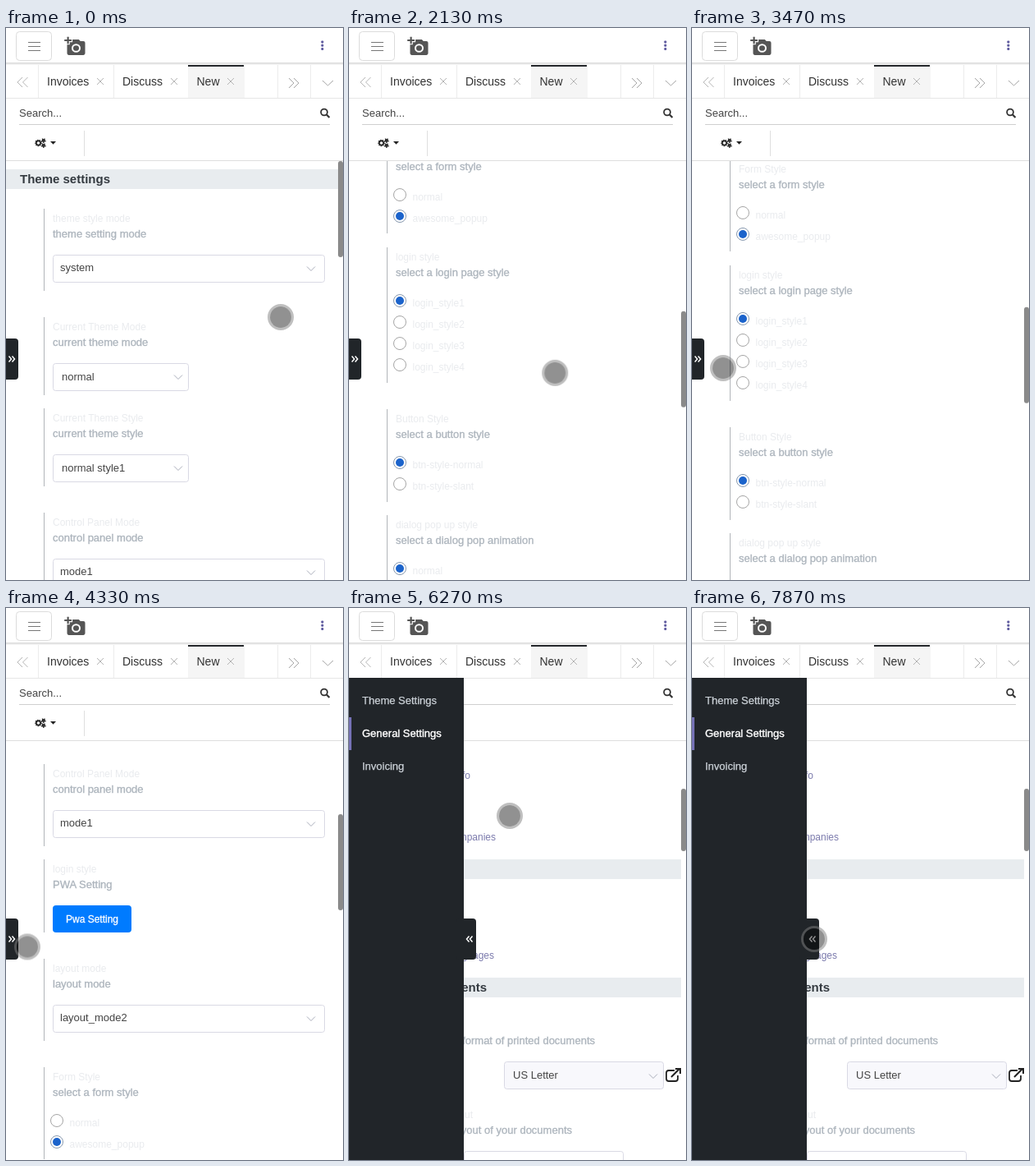
Animation of 411 by 672 pixels, one loop 8 s. Source, as an HTML page:

```html
<!DOCTYPE html>
<html lang="en">
<head>
<meta charset="utf-8">
<title>Theme settings</title>
<style>
@property --s { syntax: "<number>"; inherits: true; initial-value: 0; }
html, body { margin: 0; width: 100%; height: 100%; overflow: hidden; background: #fff; }
svg { display: block; width: 411px; height: 672px; animation: scroll 8s linear infinite; }
text { font: 13px "Liberation Sans", Arial, sans-serif; fill: #444; }
.title, .opt { font-size: 12px; fill: #e9ebee; }
.sub { fill: #adb5bd; stroke: #adb5bd; stroke-width: .35px; }
.head { font-size: 15px; font-weight: bold; fill: #343a40; }
.tab { font-size: 14px; fill: #333; }
.link { font-size: 12px; fill: #7c7bad; }
.btn { font-size: 12px; fill: #fff; stroke: #fff; stroke-width: .3px; }
.item { fill: #ced4da; stroke: #ced4da; stroke-width: .25px; }
.on { fill: #fff; stroke: #fff; stroke-width: .4px; }
.end { text-anchor: end; }
.line { fill: none; }

#list { transform: translateY(calc(var(--s) * -1px)); }
#thumb { transform: translateY(calc(var(--s) * .2225px)); }
.before { animation: hide 8s step-end infinite; }
.after { animation: show 8s step-end infinite; }
.shut { animation: shut 8s step-end infinite; }
.open { animation: open 8s step-end infinite; }
#side { animation: slide 8s linear infinite; }
#cursor { animation: move 8s linear infinite; }

@keyframes scroll {
  0%, 20.75% { --s: 0; animation-timing-function: ease-in; }
  21.625% { --s: 24; }
  24% { --s: 400; }
  26.5% { --s: 800; }
  29.125% { --s: 1200; }
  30% { --s: 1200; animation-timing-function: ease-out; }
  32.5% { --s: 1398; }
  33.125%, 34% { --s: 1400; animation-timing-function: ease-in-out; }
  37.5%, 40.875% { --s: 1000; animation-timing-function: ease-out; }
  43.375% { --s: 800; }
  46% { --s: 600; animation-timing-function: ease-out; }
  50.875%, 100% { --s: 400; }
}
@keyframes hide { 0% { visibility: visible; } 75%, 100% { visibility: hidden; } }
@keyframes show { 0% { visibility: hidden; } 75%, 100% { visibility: visible; } }
@keyframes shut { 0% { visibility: visible; } 60.5%, 100% { visibility: hidden; } }
@keyframes open { 0% { visibility: hidden; } 60.5%, 100% { visibility: visible; } }
@keyframes slide {
  0%, 60% { transform: translateX(-140px); animation-timing-function: ease; }
  64.5%, 100% { transform: none; }
}
@keyframes move {
  0%, 10% { transform: translate(335px, 352px); }
  11.3% { transform: translate(359px, 405px); }
  12.6% { transform: translate(342px, 473px); }
  14.125%, 19.125% { transform: translate(314px, 440px); animation-timing-function: ease-out; }
  21.625% { transform: translate(276px, 361px); }
  25% { transform: translate(262px, 400px); }
  29.125%, 30% { transform: translate(235px, 450px); }
  32.5% { transform: translate(227px, 458px); animation-timing-function: ease-in-out; }
  37.5%, 40.875% { transform: translate(35px, 415px); }
  43.375% { transform: translate(38px, 414px); }
  47% { transform: translate(31px, 424px); }
  50.875%, 51.625% { transform: translate(39px, 435px); }
  54.125% { transform: translate(26px, 412.5px); }
  57.5%, 61.5% { transform: translate(17px, 403px); animation-timing-function: ease-in-out; }
  70% { transform: translate(83px, 156px); }
  71.625%, 74.125% { transform: translate(87px, 152px); }
  78.375% { transform: translate(196px, 253px); animation-timing-function: ease-in-out; }
  84.125%, 85% { transform: translate(61px, 231px); animation-timing-function: ease-in-out; }
  88.375%, 90.875% { transform: translate(318px, 218px); animation-timing-function: ease-in-out; }
  98.375%, 100% { transform: translate(149px, 403px); }
}
</style>
</head>
<body>
<svg viewBox="0 0 411 672">
  <rect width="411" height="672" fill="#fff"/>
  <g class="before">
    <g id="list"></g>
    <rect id="thumb" x="405" y="162" width="6" height="117" rx="3" fill="#8a8a8a"/>
  </g>
  <g id="general" class="after"></g>
  <g id="chrome"></g>
  <g id="side"></g>
  <g id="cursor">
    <circle r="14.5" class="line" stroke="#808080" stroke-opacity=".5" stroke-width="3"/>
    <circle r="13" fill="#000" fill-opacity=".43"/>
  </g>
</svg>
<script>
const $ = id => document.getElementById(id);
const text = (x, y, s, cls = "") => `<text x="${x}" y="${y}" class="${cls}">${s}</text>`;
const rect = (x, y, w, h, fill, extra = "") =>
  `<rect x="${x}" y="${y}" width="${w}" height="${h}" fill="${fill}" ${extra}/>`;
const path = (d, color, width = 1) =>
  `<path d="${d}" class="line" stroke="${color}" stroke-width="${width}"/>`;
const chevron = (x, y, color = "#a9adba") => path(`M${x - 5} ${y - 2.5}l5 5 5-5`, color);
const box = (x, y, w, fill = "#fff") =>
  rect(x + .5, y + .5, w - 1, 33, fill, 'rx="3" stroke="#d9d9e4"');
const band = (y, s = "") => rect(0, y, 405, 24, "#e8ecef") + s;

const select = (value, narrow) => ({
  size: narrow ? 95 : 100,
  draw: y => box(57, y + 56, narrow ? 166 : 332) +
    text(narrow ? 68 : 66, y + (narrow ? 77 : 76), value) +
    chevron(narrow ? 210 : 372, y + 73)
});
const button = label => ({
  size: 89,
  draw: y => rect(57, y + 56, 96, 33, "#007bff", 'rx="4"') + text(73, y + 77, label, "btn")
});
// A "|" in an option breaks it onto a second line.
const radios = (options, picked) => ({
  draw(y) {
    let c = y + 65;
    return options.map((o, i) => {
      const rows = o.split("|"), at = c;
      c += rows.length > 1 ? 44 : 26;
      return `<circle cx="62" cy="${at}" r="7.5" fill="#fff" stroke="${i == picked ? "#8798ae" : "#a5a5a5"}"/>` +
        (i == picked ? `<circle cx="62" cy="${at}" r="5" fill="#1b63cb"/>` : "") +
        rows.map((r, k) => text(77.5, at + 7 + k * 18, r, "opt")).join("");
    }).join("");
  }
});

const sections = [
  [220, 100, "theme style mode", "theme setting mode", select("system")],
  [352, 95, "Current Theme Mode", "current theme mode", select("normal", true)],
  [463, 95, "Current Theme Style", "current theme style", select("normal style1", true)],
  [590, 100, "Control Panel Mode", "control panel mode", select("mode1")],
  [706, 89, "login style", "PWA Setting", button("Pwa Setting")],
  [827, 100, "layout mode", "layout mode", select("layout_mode2")],
  [959, 112, "Form Style", "select a form style", radios(["normal", "awesome_popup"], 1)],
  [1088, 165, "login style", "select a login page style",
    radios(["login_style1", "login_style2", "login_style3", "login_style4"], 0)],
  [1285, 113, "Button Style", "select a button style", radios(["btn-style-normal", "btn-style-slant"], 0)],
  [1414, 408, "dialog pop up style", "select a dialog pop animation",
    radios(["normal", "awesome-scale", "awesome-slide-in-right", "awesome-slide-in-bottom",
      "awesome-fall", "awesome-flip-horizontal", "awesome-effect-flip-vertical",
      "awesome-super-awesome-|scaled", "awesome-sign-in", "awesome-effect-|newspaper",
      "awesome-rotate-bottom", "awesome-rotate-left"], 0)],
  [1854, 100, "table style", "select the table style", select("bordered")],
  [1986, 100, "Font Name", "select a font name", select("Veluma")]
];

$("list").innerHTML = band(172, text(17, 189, "Theme settings", "head")) +
  sections.map(([y, h, title, sub, control]) =>
    rect(46, y, 1, h, "#b1b5ba") + text(57, y + 16, title, "title") +
    text(57, y + 35, sub, "sub") + control.draw(y)).join("");

$("general").innerHTML =
  text(148, 208, "Update Info", "link end") +
  text(179, 283, "Manage Companies", "link end") +
  band(306) +
  text(177, 427, "Manage Languages", "link end") +
  band(450, text(168, 467, "Business Documents", "head end")) +
  text(300, 531, "Set the paper format of printed documents", "sub end") +
  box(189, 552, 195, "#f8f8fc") + text(200, 573, "US Letter") + chevron(371, 570) +
  path("M397 563h-7q-3 0-3 3v7q0 3 3 3h8q3 0 3-3v-4", "#222", 1.8) +
  path("M393 571l10-10M398 561h6v6", "#222", 2) +
  text(151, 621, "Document Layout", "title end") +
  text(272, 640, "Choose the layout of your documents", "sub end") +
  box(140, 661, 195) +
  rect(405, 220, 6, 76, "#8a8a8a", 'rx="3"');

const cross = x => path(`M${x - 4} 61l8 8m0-8l-8 8`, "#b5b5b5");
const gear = (x, y, r) =>
  `<circle cx="${x}" cy="${y}" r="${r}" class="line" stroke="#222" stroke-width="1.7"/>` +
  `<circle cx="${x}" cy="${y}" r="${r + 1.1}" class="line" stroke="#222" stroke-width="1.2" stroke-dasharray="1.3 1.3"/>`;
const camera = "M3 4V1h2v3h3v2H5v3H3V6H0V4zM6 10V7h3V4h7l1.83 2H21c1.1 0 2 .9 2 2v12c0 1.1-.9 2-2 2H5" +
  "c-1.1 0-2-.9-2-2V10zM13 19a5 5 0 0 0 0-10 5 5 0 0 0 0 10zM9.8 14a3.2 3.2 0 0 0 6.4 0 3.2 3.2 0 0 0-6.4 0z";

$("chrome").innerHTML =
  rect(0, 0, 411, 162, "#fff") +
  rect(0, 42, 411, 1, "#dcdcdc") + rect(0, 43, 411, 1, "#e6e6e6") + rect(0, 44, 411, 1, "#f4f4f4") +
  rect(12.5, 4.5, 43, 35, "#fff", 'rx="4" stroke="#dcdcdc"') +
  [17, 22, 27].map(y => rect(27, y, 15, 1, "#777")).join("") +
  `<path d="${camera}" transform="translate(71.2 9.8) scale(1.1 1.05)" fill="#555" fill-rule="evenodd"/>` +
  [15.5, 19.8, 24.1].map(y => rect(384.3, y, 3, 3, "#5f5b9f", 'rx="1"')).join("") +
  rect(222, 45, 69, 40, "#f5f5f5") + rect(222, 45, 68, 2, "#25282c") +
  [39, 131, 331, 371].map(x => rect(x, 45, 1, 40, "#ececec")).join("") +
  rect(0, 85, 411, 1, "#e6e6e6") +
  path("M20 60l-6 6 6 6M26.500 60l-6 6 6 6", "#b5b5b5") +
  path("M345 61l6 6-6 6M351 61l6 6-6 6", "#a5a5a5") +
  path("M386 64l6.500 6 6.500-6", "#a5a5a5") +
  text(50, 70, "Invoices", "tab") + cross(115) +
  text(142, 70, "Discuss", "tab") + cross(205) +
  text(232.5, 70, "New", "tab") + cross(274) +
  text(16, 108, "Search...") +
  rect(16, 117, 379, 1, "#cfcfcf") +
  '<circle cx="388" cy="102.500" r="3.900" class="line" stroke="#333" stroke-width="1.800"/>' +
  path("M391 105.500l3.500 3.500", "#333", 2.2) +
  gear(39.5, 140, 2.6) + gear(45.8, 137, 1.2) + gear(45.8, 143, 1.2) +
  '<path d="M54 138h7l-3.500 3.800z" fill="#222"/>' +
  rect(95, 125, 1, 31, "#dedede") + rect(0, 161, 411, 1, "#dedede");

const item = (y, s, on) => (on ? rect(0, y, 3, 40, "#7571b5") : "") +
  text(16, y + 24, s, "item" + (on ? " on" : ""));
const menu = active => ["Theme Settings", "General Settings", "Invoicing"]
  .map((s, i) => item(93 + i * 40, s, i == active)).join("");

$("side").innerHTML =
  rect(0, 85, 140, 587, "#212529") +
  rect(130, 378, 25, 50, "#212529", 'rx="4"') +
  `<g class="before">${menu(0)}</g><g class="after">${menu(1)}</g>` +
  `<g class="shut">${path("M143.500 399.500l3 3.500-3 3.500M147.500 399.500l3 3.500-3 3.500", "#fff", 1.5)}</g>` +
  `<g class="open">${path("M146.500 399.500l-3 3.500 3 3.500M150.500 399.500l-3 3.500 3 3.500", "#fff", 1.5)}</g>`;
</script>
</body>
</html>
```
